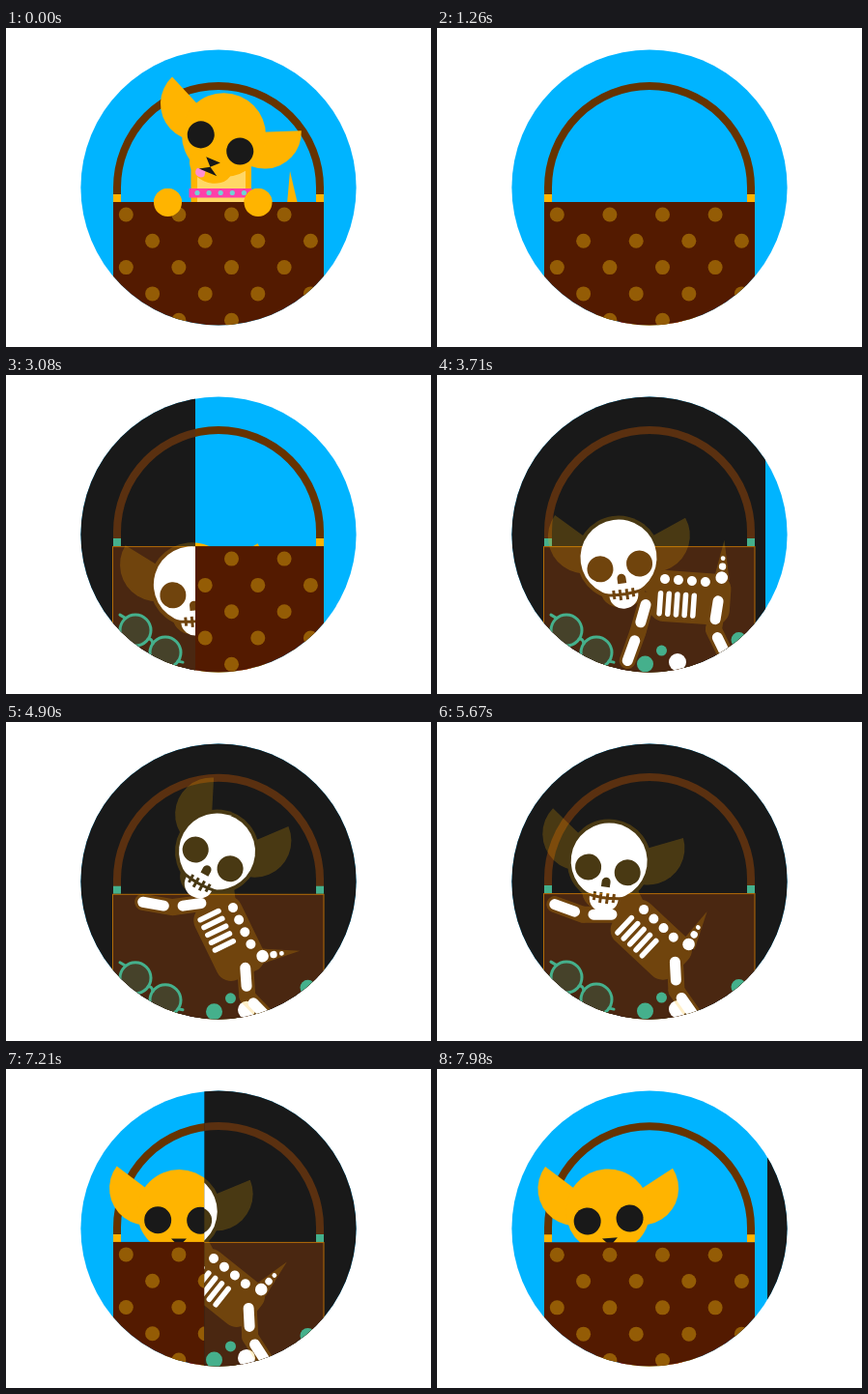
These frames come from a looping animation (440 px wide and 330 px high, 8000 ms). An HTML page:

```html
<!DOCTYPE html>
<html lang="en">
<head>
<meta charset="utf-8">
<title>Dog in a bag</title>
<style>
html, body { margin: 0; width: 100%; height: 100%; overflow: hidden; background: #fff; }
svg { display: block; width: 100%; height: 100%; }
.bone { stroke: #fff; stroke-width: 11; stroke-linecap: round; }
.rib { stroke: #fff; stroke-width: 5.5; stroke-linecap: round; }
.limb { stroke: #ffb400; stroke-width: 17; stroke-linecap: round; }
</style>
</head>
<body>
<svg id="stage" viewBox="0 0 440 330"></svg>
<script>
const FRAME = 70, LOOP = 8000;
const GOLD = '#ffb400', INK = '#191919', MINT = '#45b08c';

const circle = (x, y, r, fill) => `<circle cx="${x}" cy="${y}" r="${r}" fill="${fill}"/>`;
const line = (x1, y1, x2, y2, cls) => `<line x1="${x1}" y1="${y1}" x2="${x2}" y2="${y2}" class="${cls}"/>`;
const repeat = (n, fn) => Array.from({ length: n }, (_, i) => fn(i)).join('');

const handle = (strap, clasp) => `
  <path d="M115 176V165A105 105 0 0 1 325 165V176" fill="none" stroke="${strap}" stroke-width="8"/>
  <path d="M111 172h8v8h-8zM321 172h8v8h-8z" fill="${clasp}"/>`;

const spots = repeat(5, row => repeat(4, col =>
  circle(124.3 + col * 54.6 + (row % 2) * 27.3, 193 + row * 27.3, 7.5, '#945c05')));

const contents = `
  <g fill="#46422a" stroke="${MINT}" stroke-width="3" stroke-linecap="round">
    <circle cx="134" cy="267" r="16"/><circle cx="165" cy="290" r="16"/>
    <path d="M147 276q4-1 5 5M123 254l-5-3M178 299l5 1" fill="none"/>
  </g>` + circle(215.5, 302, 8.5, MINT) + circle(232.5, 288, 5.5, MINT) +
  circle(312.5, 277, 8, MINT) + circle(249, 300, 9, '#fff');

const ear = 'M65.6-3A38 38 0 0 1-10.4-3Z';
const headShape = `
  <path class="earL" d="${ear}"/><path class="earR" d="${ear}"/>
  <circle r="43.5"/><ellipse cy="34" rx="23" ry="18"/>`;

const face = circle(-22, 9, 14, INK) + circle(22, 9, 14, INK) + `
  <path d="M-12 42a5.5 5.5 0 0 0 10 5l-1-6z" fill="#ff8fd0"/>
  <path d="M-8 28H8L0 36L10 42H-10L0 36Z" fill="${INK}"/>`;

const skull = `
  <g mask="url(#holes)" fill="#fff">
    <circle r="39.5"/><path d="M-15 35H15V39A15 14 0 0 1-15 39Z"/>
  </g>`;

const limb = (cls, x, y, cut) => {
  const part = (a, b) => line(a, 0, b, 0, cut ? 'bone' : 'limb');
  return `<g transform="translate(${x} ${y})"><g class="${cls}U">${cut ? part(5, 24) : part(0, 34)}
    <g transform="translate(35 0)"><g class="${cls}L">${cut ? part(9, 31) : part(0, 31)}</g></g></g></g>`;
};
const limbs = cut => limb('arm', -17, 23, cut) + limb('leg', 57, 14, cut);

const torsoShape = `
  <rect x="-15" y="-9" width="84" height="53" rx="16"/>
  <g transform="translate(58.5 -5.5)"><path class="tail" d="M-2-8L39 0L-2 8Z"/></g>`;
const skeleton = repeat(4, i => circle(i * 14, 0, 5, '#fff')) +
  repeat(5, i => line(-3.4 + i * 8.7, 15, -3.4 + i * 8.7, 36, 'rib')) + `
  <g transform="translate(58.5 -5.5)">${circle(0, 0, 6.3, '#fff')}
    <g class="tail">${circle(11.5, 0, 3.7, '#fff')}${circle(20, 0, 2.4, '#fff')}</g></g>`;

const paws = circle(167.5, 180.5, 14.5, GOLD) + circle(261, 180.5, 14.5, GOLD);
const frontBody = `
  <path class="wag" d="M291 182L294 148L302 182Z" fill="${GOLD}"/>
  <rect x="191.5" y="120" width="62.5" height="90" fill="${GOLD}"/>
  <rect x="198" y="130" width="50" height="80" fill="#ffd766"/>
  <rect x="189.5" y="166" width="65" height="9.5" fill="#ff3fa9"/>` +
  repeat(5, i => circle(198 + i * 12.1, 170.5, 2.6, '#70d4d4')) + paws;

const stage = document.getElementById('stage');
stage.innerHTML = `
  <defs>
    <clipPath id="disc"><circle cx="220" cy="165" r="142.6"/></clipPath>
    <clipPath id="scan"><rect id="scanBox" y="0" height="330"/></clipPath>
    <mask id="holes" maskUnits="userSpaceOnUse" x="-60" y="-60" width="120" height="130">
      <rect x="-60" y="-60" width="120" height="130" fill="#fff"/>
      <circle cx="-20.5" cy="9" r="13.5"/><circle cx="20.5" cy="9" r="13.5"/>
      <path d="M-4.5 27V21.5a4.5 4.5 0 0 1 9 0V27z"/>
      <path d="M-19 36.5Q0 40 19 36.5M-10 33v9M-3.5 33v11M3.5 33v11M10 33v9" fill="none" stroke="#000" stroke-width="3"/>
    </mask>
  </defs>
  <g clip-path="url(#disc)">
    <rect width="440" height="330" fill="#00b4ff"/>
    <g class="bag">${handle('#663300', GOLD)}</g>
    <g class="sink">${frontBody}</g>
    <g class="head" fill="${GOLD}">${headShape}${face}</g>
    <g class="bag"><rect x="111" y="180" width="218" height="190" fill="#531a00"/>${spots}</g>
    <g id="paws">${paws}</g>
    <g clip-path="url(#scan)">
      <rect width="440" height="330" fill="${INK}"/>
      <g class="bag">${handle('#5a3010', MINT)}
        <rect x="110.5" y="180.5" width="218.5" height="190" fill="#4a2711" stroke="#b36b08"/>${contents}</g>
      <g fill="${GOLD}" opacity=".21">
        <line id="neck" stroke="${GOLD}" stroke-width="26"/>
        <g class="torso">${torsoShape}${limbs(false)}</g>
        <g class="head">${headShape}</g>
      </g>
      <g class="torso">${skeleton}${limbs(true)}</g>
      <g class="head">${skull}</g>
    </g>
  </g>`;

// time, x, y, tilt, left ear lift, right ear lift
const headKeys = [
  [0, 225.5, 110.7, 23, 24, 25],
  [800, 208, 116, -22, 25, 24],
  [1260, 202, 246, -10, 30, 30],
  [2600, 196, 240, -4, 32, 28],
  [3620, 188, 189, -8, 44, 21],
  [3800, 188, 189, -8, 44, 21],
  [4900, 218.5, 134, 29, 64, 52],
  [5700, 178, 144, 8, 36, 24],
  [6440, 181.5, 148, 5, 32, 17],
  [7980, 177, 147, -4, 41, 29]
];
// time, spine x, y, angle, tail, upper arm, forearm, thigh, shin
const bodyKeys = [
  [2600, 243, 258, 4, -78, 82, 18, 84, -20],
  [3620, 236, 211, 4, -90, 106, 4, 99, -35],
  [3800, 236, 211, 4, -90, 106, 4, 99, -35],
  [4900, 235, 192, 64, -72, 172, 18, 86, -40],
  [5700, 214, 194, 43, -104, 180, 20, 87, -32],
  [6440, 216, 196, 41, -91, 178, 23, 86, -30],
  [7980, 214, 196, 36, -80, 172, 20, 88, -30]
];

const clamp01 = v => Math.min(1, Math.max(0, v));
const smooth = (a, b, t) => { const u = clamp01((t - a) / (b - a)); return u * u * (3 - 2 * u); };

function pose(keys, t) {
  const next = keys.findIndex(k => k[0] > t);
  if (next < 0) return keys[keys.length - 1].slice(1);
  if (next === 0) return keys[0].slice(1);
  const a = keys[next - 1], b = keys[next], u = smooth(a[0], b[0], t);
  return a.slice(1).map((v, i) => v + (b[i + 1] - v) * u);
}

const parts = {};
function move(cls, transform) {
  parts[cls] ??= stage.querySelectorAll('.' + cls);
  parts[cls].forEach(el => el.setAttribute('transform', transform));
}
function setAttrs(id, attrs) {
  const el = document.getElementById(id);
  for (const name in attrs) el.setAttribute(name, attrs[name]);
}

function bagTransform(t) {
  if (t >= 1890 && t < 2450) {
    const angle = 5.5 * Math.sin(2 * Math.PI * (t - 1820) / 315);
    return `rotate(${angle} ${angle > 0 ? 329 : 111} 308)`;
  }
  const lift = 1.8 + 1.1 * Math.cos(2 * Math.PI * (t / 650 - 0.73));
  return `translate(0 ${-lift * smooth(2450, 2800, t)})`;
}

function draw(t) {
  const [hx, hy, tilt, liftL, liftR] = pose(headKeys, t);
  const [sx, sy, spine, tail, armU, armL, legU, legL] = pose(bodyKeys, t);
  move('bag', bagTransform(t));
  move('head', `translate(${hx} ${hy}) rotate(${tilt})`);
  move('earR', `translate(14 -5) rotate(${-liftR})`);
  move('earL', `translate(-14 -5) scale(-1 1) rotate(${-liftL})`);
  move('torso', `translate(${sx} ${sy}) rotate(${spine})`);
  move('tail', `rotate(${tail})`);
  move('armU', `rotate(${armU - spine})`);
  move('armL', `rotate(${armL})`);
  move('legU', `rotate(${legU - spine})`);
  move('legL', `rotate(${legL})`);
  move('sink', `translate(0 ${130 * smooth(800, 1260, t)})`);
  move('wag', `rotate(${10 * Math.sin(2 * Math.PI * t / 420)} 296.5 182)`);
  setAttrs('paws', { visibility: t < 910 ? 'visible' : 'hidden' });

  const a = spine * Math.PI / 180;
  setAttrs('neck', {
    x1: hx, y1: hy,
    x2: sx - 10 * Math.sin(a), y2: sy + 10 * Math.cos(a)
  });
  const front = 340 + (t - 3710) * 16 / 70;
  const back = Math.max(0, 342 + (t - 7980) * 0.1775);
  setAttrs('scanBox', { x: back, width: Math.max(0, front - back) });
}

const start = performance.now();
function tick() {
  const t = (performance.now() - start) % LOOP;
  draw(Math.floor(t / FRAME) * FRAME);
  requestAnimationFrame(tick);
}
tick();
</script>
</body>
</html>
```
